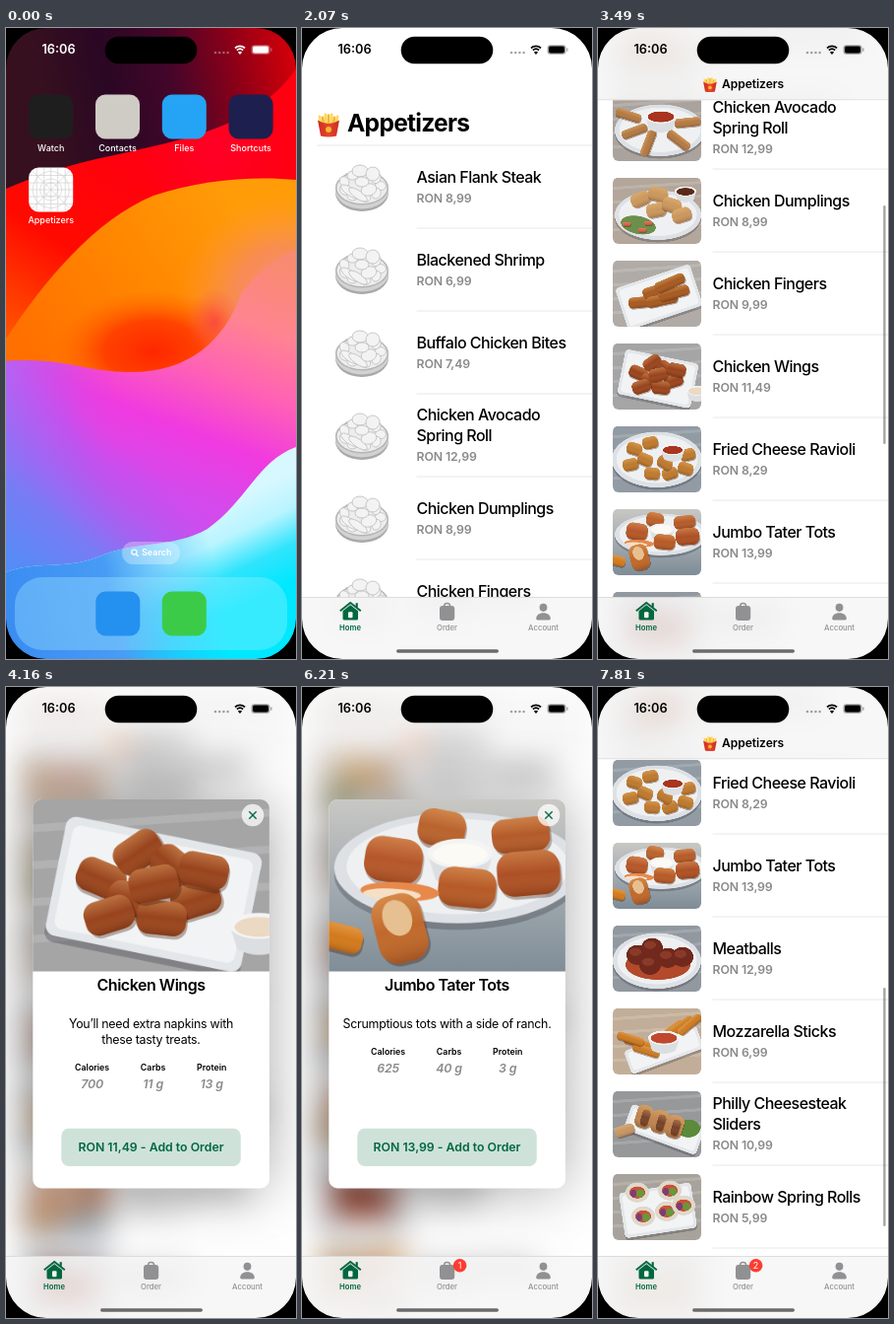
An HTML page with a canvas for the animation above (8000 ms loop, 295 by 640 pixels).

```html
<!DOCTYPE html>
<html lang="en">
<head>
<meta charset="utf-8">
<title>Appetizers</title>
<style>
html, body { margin: 0; width: 100%; height: 100%; overflow: hidden; background: #000; }
canvas { display: block; width: 295px; height: 640px; }
</style>
</head>
<body>
<canvas id="stage"></canvas>
<script>
const W = 295, H = 640, LOOP = 8000, TAU = Math.PI * 2;
const dpr = Math.max(1, window.devicePixelRatio || 1);
const GREEN = '#00683f', GRAY = '#8a8a8d';

function layer(w, h, scale, canvas = document.createElement('canvas')) {
  canvas.width = w * scale;
  canvas.height = h * scale;
  const g = canvas.getContext('2d');
  g.scale(scale, scale);
  return g;
}
const ctx = layer(W, H, dpr, document.getElementById('stage'));
const rows = layer(W, H, dpr), page = layer(W, H, dpr);

// ---------- helpers ----------
function text(g, str, x, y, size, weight, color, align = 'left', track = -0.01, style = '') {
  g.font = `${style} ${weight} ${size}px Inter, "Noto Sans", sans-serif`;
  g.letterSpacing = track * size + 'px';
  g.textAlign = align;
  g.textBaseline = 'middle';
  g.fillStyle = color;
  g.fillText(str, x, y);
}
function box(g, x, y, w, h, r, fill) {
  g.beginPath();
  g.roundRect(x, y, w, h, r);
  g.fillStyle = fill;
  g.fill();
}
function oval(g, x, y, rx, ry, fill, rot = 0) {
  g.beginPath();
  g.ellipse(x, y, rx, ry, rot, 0, TAU);
  g.fillStyle = fill;
  g.fill();
}
function line(g, pts, color, width) {
  g.beginPath();
  pts.forEach(([x, y], i) => i ? g.lineTo(x, y) : g.moveTo(x, y));
  g.strokeStyle = color;
  g.lineWidth = width;
  g.stroke();
}
function path(g, d, fill) {
  g.fillStyle = fill;
  g.fill(new Path2D(d));
}
function stops(grad, colors) {
  colors.forEach((c, i) => grad.addColorStop(i / (colors.length - 1), c));
  return grad;
}
const lin = (g, x0, y0, x1, y1, ...c) => stops(g.createLinearGradient(x0, y0, x1, y1), c);
const rad = (g, x, y, r, ...c) => stops(g.createRadialGradient(x, y, 0, x, y, r), c);
const at = (t, keys) => keys.reduce((v, k) => t >= k[0] ? k[1] : v, keys[0][1]);
const blit = (g, src) => g.drawImage(src.canvas, 0, 0, W, H);

// Soft stretched glow, kept inside an outline
function glow(g, d, x, y, rx, ry, ...colors) {
  g.save();
  g.clip(new Path2D(d));
  g.translate(x, y);
  g.scale(1, ry / rx);
  oval(g, 0, 0, rx, rx, rad(g, 0, 0, rx, ...colors));
  g.restore();
}

// ---------- food pictures, 90 x 67 each ----------
function bit(g, x, y, w, h, c, rot = 0) {
  g.save();
  g.translate(x, y);
  g.rotate(rot);
  const r = Math.min(w, h) * 0.38;
  box(g, -w / 2 + 0.6, -h / 2 + 1.2, w, h, r, 'rgba(60,25,10,.35)');
  box(g, -w / 2, -h / 2, w, h, r, c);
  box(g, -w / 2, -h / 2, w, h, r, lin(g, 0, -h / 2, 0, h / 2, 'rgba(255,200,130,.35)', 'rgba(255,200,130,0)', 'rgba(70,20,0,.25)'));
  g.restore();
}
const bits = (g, list, w, h, c) => list.forEach(([x, y, rot = 0]) => bit(g, x, y, w, h, c, rot));
function plate(g, x, y, rx, ry, rot = 0) {
  oval(g, x, y + 2.5, rx, ry, 'rgba(50,50,60,.3)', rot);
  oval(g, x, y, rx, ry, '#dde1e5', rot);
  oval(g, x, y - 0.5, rx * 0.9, ry * 0.86, '#eff0f1', rot);
}
function tray(g, x, y, w, h, rot) {
  g.save();
  g.translate(x, y);
  g.rotate(rot);
  box(g, -w / 2, -h / 2 + 2.5, w, h, 4, 'rgba(50,50,60,.3)');
  box(g, -w / 2, -h / 2, w, h, 4, '#e4e7ea');
  box(g, -w / 2 + 3, -h / 2 + 3, w - 6, h - 6, 3, '#f2f3f4');
  g.restore();
}
function cup(g, x, y, r, sauce) {
  path(g, `M${x - r} ${y}L${x - r * 0.75} ${y + r * 0.8}Q${x} ${y + r * 1.2} ${x + r * 0.75} ${y + r * 0.8}L${x + r} ${y}Z`, '#dcdfe2');
  oval(g, x, y, r, r * 0.45, '#f4f4f4');
  oval(g, x, y + 0.4, r * 0.84, r * 0.34, sauce);
}
function ring(n, x, y, rx, ry, from = 0, span = TAU) {
  return Array.from({ length: n }, (_, i) => {
    const a = from + span * i / n;
    return [x + Math.cos(a) * rx, y + Math.sin(a) * ry, a];
  });
}
const RED = '#a93420';
const dishes = [
  ['#a9a39d', g => { plate(g, 46, 36, 42, 26); bits(g, [[28, 32, -.4], [40, 34, -.4], [52, 36, -.4], [64, 38, -.4]], 9, 26, '#8a4429'); }],
  ['#b5b1aa', g => { plate(g, 45, 36, 41, 27); bits(g, ring(7, 45, 36, 25, 14), 15, 9, '#b9552b'); cup(g, 45, 33, 9, '#ead9a8'); }],
  ['#aeb0b2', g => { plate(g, 46, 36, 42, 26); bits(g, ring(8, 44, 37, 22, 12), 15, 12, '#c2561f'); cup(g, 64, 20, 10, '#f5f1e4'); }],
  ['#aaa39d', g => { plate(g, 48, 36, 46, 26); bits(g, [[16, 21, .3], [22, 37, -.35], [36, 49, -1.2], [67, 46, .65], [76, 28, -.1]], 27, 9, '#b27a45'); cup(g, 49, 22, 16, RED); }],
  ['#b3a69b', g => { plate(g, 46, 38, 44, 25); cup(g, 74, 14, 11, '#5a2a18'); oval(g, 26, 48, 18, 9, '#6d8f4d', .2); bits(g, [[14, 47], [30, 53], [36, 46]], 8, 4, '#d8604a'); bits(g, [[28, 22, -.4], [46, 17, .2], [44, 33, -.2], [60, 28, .3], [70, 38, -.3]], 20, 14, '#c9985f'); }],
  ['#b0aba6', g => { tray(g, 47, 37, 80, 44, -.32); bits(g, [[32, 42, -.1], [46, 30, -.3], [50, 40, -.2], [62, 33, -.25], [58, 23, -.4]], 32, 11, '#a55a22'); }],
  ['#a5a5a6', g => { tray(g, 46, 36, 76, 46, .2); cup(g, 86, 48, 11, '#ecd9c4'); bits(g, [[26, 30, .4], [40, 20, -.6], [38, 38, .2], [54, 26, .7], [62, 38, -.3], [49, 45, .1], [29, 44, -.3], [65, 27, .2], [46, 32, -.2]], 19, 13, '#98441e'); }],
  ['#929ba3', g => { plate(g, 45, 34, 46, 28); bits(g, [[22, 23, .3], [38, 17, -.2], [18, 39, -.2], [33, 34, .4], [40, 48, .1], [58, 48, -.3], [74, 43, .3], [53, 37, .5], [76, 29, -.2]], 16, 12, '#bd7a30'); cup(g, 61, 24, 12, RED); }],
  ['#9aa4ab', g => {
    g.fillStyle = lin(g, 0, 0, 0, 67, '#c9c8c4', '#a3abb1', '#7f8c96');
    g.fillRect(0, 0, 90, 67);
    plate(g, 49, 26, 47, 21);
    bit(g, 43, 11, 18, 14, '#b9632f', .2);
    bit(g, 73, 13.5, 22, 13, '#b45b2b', -.1);
    bit(g, 24.6, 23, 22, 17, '#b5572b', .15);
    bit(g, 76, 28, 24, 17, '#ad5026', -.08);
    cup(g, 50, 20.5, 12.5, '#fbfaf4');
    bit(g, 52.6, 33.5, 22, 15, '#b65a28', .1);
    oval(g, 27, 35, 15, 3.6, '#e8894c', .05);
    oval(g, 24, 36, 11, 2.2, '#f6dfc4', .05);
    bit(g, 3, 52, 20, 10, '#d27a1d', .25);
    bit(g, 27, 49, 19, 26, '#c0692c', -.25);
    oval(g, 26, 45, 5.5, 7, '#e6c090', -.4);
  }],
  ['#92989f', g => { plate(g, 45, 36, 45, 28); oval(g, 46, 40, 33, 15, '#b34a2b'); for (const [x, y] of [[25, 30], [40, 23], [56, 33], [71, 32], [38, 40]]) { oval(g, x, y, 11, 10, '#70291c'); oval(g, x - 2, y - 3, 6, 4, '#8a3a29'); } }],
  ['#c2ae98', g => { tray(g, 52, 42, 78, 25, -.35); bits(g, [[25, 35, .3], [34, 43, .3], [60, 22, -.6], [69, 18, -.6], [78, 17, -.7], [18, 31, .3]], 28, 8, '#cc7c24'); cup(g, 52, 30, 16, '#c0492d'); }],
  ['#96989a', g => { tray(g, 52, 39, 78, 27, .35); oval(g, 77, 38, 12, 9, '#5a8a3a'); bits(g, [[32, 26, .3], [48, 31, .3], [63, 36, .3]], 17, 23, '#bd8551'); bits(g, [[33, 27, .3], [49, 32, .3], [64, 37, .3]], 8, 16, '#75422b'); bit(g, 12, 40, 20, 11, '#c49867', -.3); }],
  ['#a7a39c', g => { tray(g, 46, 37, 74, 46, -.15); for (const [x, y] of [[25, 19], [58, 17], [31, 43], [55, 38], [72, 32]]) { oval(g, x, y, 12, 10, '#e0d8cb'); oval(g, x, y, 8, 6, '#c95238'); oval(g, x + 3, y + 1, 4, 4, '#6b963a'); oval(g, x - 4, y + 1, 3, 4, '#7e3d73'); } }],
  ['#b0a59d', g => { plate(g, 45, 36, 42, 27); bits(g, ring(6, 45, 36, 23, 12), 22, 11, '#b88447'); }]
].map(([bg, draw]) => {
  const g = layer(90, 67, 3);
  g.fillStyle = bg;
  g.fillRect(0, 0, 90, 67);
  for (let y = 11; y < 67; y += 14) line(g, [[0, y], [90, y - 6]], 'rgba(255,255,255,.14)', 3);
  draw(g);
  return g.canvas;
});

const menu = [
  ['Asian Flank Steak', '8,99'], ['Blackened Shrimp', '6,99'], ['Buffalo Chicken Bites', '7,49'],
  ['Chicken Avocado\nSpring Roll', '12,99'], ['Chicken Dumplings', '8,99'], ['Chicken Fingers', '9,99'],
  ['Chicken Wings', '11,49'], ['Fried Cheese Ravioli', '8,29'], ['Jumbo Tater Tots', '13,99'],
  ['Meatballs', '12,99'], ['Mozzarella Sticks', '6,99'], ['Philly Cheesesteak\nSliders', '10,99'],
  ['Rainbow Spring Rolls', '5,99'], ['', '']
];
const orders = [
  { from: 3900, to: 4680, item: 6, about: ['You’ll need extra napkins with', 'these tasty treats.'], facts: ['700', '11 g', '13 g'] },
  { from: 5950, to: 6590, item: 8, about: ['Scrumptious tots with a side of ranch.'], facts: ['625', '40 g', '3 g'] }
];
const scrollKeys = [
  [0, 0], [2940, 45], [3060, 190], [3170, 285], [3490, 312],
  [5110, 329], [5230, 362], [5350, 384], [5470, 396], [5590, 402],
  [7310, 450], [7430, 570], [7550, 628], [7810, 642]
];

// Grey bowl shown until a picture has loaded
function emptyDish(g, cx, cy) {
  oval(g, cx, cy + 5, 27, 19, '#a9a9a9');
  oval(g, cx, cy + 3, 27, 18.5, '#d2d2d2');
  oval(g, cx, cy, 27, 17.5, '#b5b5b5');
  oval(g, cx, cy, 25.5, 16, '#ededed');
  const blob = (x, y, rx, ry, rot) => {
    oval(g, cx + x, cy + y, rx, ry, '#f3f3f3', rot);
    g.strokeStyle = '#bcbcbc';
    g.lineWidth = 0.8;
    g.stroke();
  };
  for (const [x, y] of ring(9, 0, -2, 19, 12)) blob(x, y, 5.5, 4.5, x);
  blob(-2, -17, 8, 6, 0);
  blob(11, -14, 7, 7, 0);
  blob(-12, 4, 11, 4, 0.6);
  blob(-4, 7, 11, 4, 0.6);
  blob(7, 2, 8, 6, -0.3);
  blob(0, -6, 7, 5, 0);
}

function fries(g, x, y, s) {
  g.save();
  g.translate(x, y);
  g.scale(s, s);
  for (let i = 0; i < 7; i++) {
    g.save();
    g.translate(4.5 + i * 2.5, 13);
    g.rotate((i - 3) * 0.07);
    box(g, -1.3, -12 + Math.abs(i - 3) + (i % 2) * 2, 2.6, 14, 0.6, i % 2 ? '#f3b62f' : '#ffd75a');
    g.restore();
  }
  path(g, 'M1 9Q12 16 23 9L20 25Q12 27 4 25Z', lin(g, 0, 0, 24, 0, '#c9291f', '#e8452f', '#c9291f'));
  oval(g, 12, 18.5, 3, 3, '#f5b62d');
  g.restore();
}

// ---------- home screen ----------
function wallpaper(g) {
  g.fillStyle = lin(g, 120, 120, 0, 320, '#ff0010', '#ff0a00', '#ff5a00');
  g.fillRect(0, 0, W, H);
  g.fillStyle = rad(g, 215, 125, 80, 'rgba(255,0,48,.7)', 'rgba(255,0,48,0)');
  g.fillRect(0, 0, W, 260);

  path(g, 'M0 0H295V42C280 62 262 78 235 92C205 108 160 118 110 129C65 138 30 150 0 163Z',
    lin(g, 40, 70, 295, 20, '#36101f', '#2a0724', '#45062a', '#8c0018', '#d80008'));

  const petal = 'M0 315C40 255 90 195 150 170C200 153 255 150 295 154V420H0Z';
  path(g, petal, lin(g, 20, 320, 230, 170, '#ff7000', '#ff8600', '#ff9c08'));
  glow(g, petal, 285, 275, 110, 105, '#ff8a84', 'rgba(245,138,100,.8)', 'rgba(255,150,60,0)');
  glow(g, petal, 150, 328, 100, 62, '#ff2600', 'rgba(255,50,0,.8)', 'rgba(255,100,0,0)');
  glow(g, petal, 212, 298, 28, 34, 'rgba(250,60,70,.75)', 'rgba(250,90,80,0)');

  const pink = 'M0 338C60 334 80 349 125 349C185 350 222 318 240 268C262 240 280 230 295 225V640H0Z';
  path(g, pink, lin(g, 260, 235, 170, 470, '#f98a72', '#ff8490', '#ff62b4', '#f03ae0', '#d44aec'));
  path(g, pink, lin(g, 0, 400, 120, 380, '#b268f4', 'rgba(200,80,235,.7)', 'rgba(235,60,220,0)'));
  path(g, pink, lin(g, 0, 590, 130, 430, '#3f96f5', '#787cf5', 'rgba(170,90,245,0)'));

  const wave = 'M295 425C255 440 245 480 205 508C170 528 130 520 95 536C60 550 30 540 0 552V640H295Z';
  path(g, wave, lin(g, 225, 480, 268, 572, '#d8f8ff', '#b8f4ff', '#30e4fc', '#00e8ff'));
  path(g, wave, lin(g, 0, 600, 215, 560, '#3a8cf2', '#489cf5', 'rgba(40,190,250,0)'));
}

function gridIcon(g, x, y) {
  g.save();
  g.beginPath();
  g.roundRect(x, y, 45, 45, 10);
  g.fillStyle = '#fff';
  g.fill();
  g.clip();
  g.translate(x, y);
  for (const p of [8, 15.5, 22.5, 29.5, 37]) {
    line(g, [[p, 0], [p, 45]], '#c9c9c9', 0.6);
    line(g, [[0, p], [45, p]], '#c9c9c9', 0.6);
  }
  line(g, [[0, 0], [45, 45]], '#c9c9c9', 0.6);
  line(g, [[45, 0], [0, 45]], '#c9c9c9', 0.6);
  for (const r of [7, 11, 18.5]) {
    g.beginPath();
    g.arc(22.5, 22.5, r, 0, TAU);
    g.stroke();
  }
  g.restore();
}

function home(g, t) {
  wallpaper(g);
  status(g, '#fff');
  const apps = [['Watch', '#1e1e1f'], ['Contacts', '#cfcbc5'], ['Files', '#25a4f5'], ['Shortcuts', '#1d1f4e']];
  if (t < 870) {
    apps.forEach(([name, color], i) => {
      box(g, 23.2 + i * 67.8, 67.5, 45, 45, 10, color);
      text(g, name, 45.7 + i * 67.8, 122, 9, 500, '#fff', 'center', 0);
    });
    gridIcon(g, 23.2, 141.5);
    text(g, 'Appetizers', 45.7, 195.5, 9, 500, '#fff', 'center', 0);
    if (t >= 760) box(g, 23.2, 141.5, 45, 45, 10, 'rgba(0,0,0,.35)');
  }
  box(g, 118, 521, 59, 23, 11.5, 'rgba(255,255,255,.3)');
  g.beginPath();
  g.arc(130.4, 531.6, 2.6, 0, TAU);
  g.strokeStyle = '#fff';
  g.lineWidth = 1.2;
  g.stroke();
  line(g, [[132.3, 533.5], [134.6, 535.8]], '#fff', 1.4);
  text(g, 'Search', 138, 532.7, 9, 600, '#fff', 'left', 0);
  box(g, 9, 557, 277, 74, 28, 'rgba(170,240,255,.32)');
  box(g, 91.3, 571.5, 45, 45, 10, '#2490f0');
  box(g, 158.8, 571.5, 45, 45, 10, '#3ccb48');
}

// ---------- shared chrome ----------
function status(g, color) {
  text(g, '16:06', 53.5, 22, 12.75, 600, color, 'center', 0);
  g.save();
  g.globalAlpha = 0.35;
  for (let i = 0; i < 4; i++) oval(g, 213 + i * 4.2, 25, 1.3, 1.3, color);
  box(g, 249.5, 17.2, 19, 9.6, 3, color);
  box(g, 269.2, 20.2, 1.3, 3.6, 1, color);
  g.restore();
  box(g, 251, 18.6, 16, 6.8, 1.8, color);
  g.strokeStyle = color;
  g.lineWidth = 1.7;
  for (const r of [4.7, 7.6]) {
    g.beginPath();
    g.arc(238, 26, r, -2.3, -0.84);
    g.stroke();
  }
  path(g, 'M238 27L235.9 24.5Q238 22.8 240.1 24.5Z', color);
}

function tabs(g, count) {
  line(g, [[38.8, 591.2], [49.2, 583], [59.8, 591.2]], GREEN, 1.9);
  box(g, 54.6, 583.2, 2.2, 4.5, 0, GREEN);
  path(g, 'M41.5 591.2L49.2 585.2L57 591.2V599Q57 600.6 55.4 600.6H43Q41.5 600.6 41.5 599Z', GREEN);
  box(g, 47, 592.3, 4.5, 6, 1, '#f3f5f4');
  const icon = '#919193';
  box(g, 140, 586, 15.2, 15, 3, icon);
  g.beginPath();
  g.arc(147.6, 586.5, 3.1, Math.PI, 0);
  g.strokeStyle = icon;
  g.lineWidth = 1.5;
  g.stroke();
  oval(g, 245.5, 587.8, 3.9, 4.1, icon);
  path(g, 'M238.2 599.6C238 595.5 241.5 593.3 245.5 593.3S253 595.5 252.8 599.6Q252.6 600.4 251.5 600.4H239.5Q238.4 600.4 238.2 599.6Z', icon);
  text(g, 'Home', 49, 608.8, 7.7, 600, GREEN, 'center', 0);
  text(g, 'Order', 147.5, 608.8, 7.7, 500, icon, 'center', 0);
  text(g, 'Account', 245.5, 608.8, 7.7, 500, icon, 'center', 0);
  if (count) {
    oval(g, 160.6, 586.8, 6.8, 6.8, '#ff3b30');
    text(g, count, 160.6, 587, 9, 400, '#fff', 'center', 0);
  }
}

function spinner(g, t) {
  const head = 4 + Math.floor((t - 980) / 125) + 80;
  for (let i = 0; i < 8; i++) {
    const age = (head - i) % 8;
    g.save();
    g.translate(147.5, 312.3);
    g.rotate(i * TAU / 8);
    box(g, 4.6, -1.3, 6.6, 2.6, 1.3, `rgba(30,75,70,${Math.max(0.1, 0.42 - age * 0.07)})`);
    g.restore();
  }
}

// ---------- app ----------
function drawRows(g, scroll, loaded) {
  g.fillStyle = '#fff';
  g.fillRect(0, 0, W, H);
  fries(g, 15, 84.5 - scroll, 1);
  text(g, 'Appetizers', 46, 98 - scroll, 24.6, 700, '#000', 'left', -0.03);
  line(g, [[15, 119 - scroll], [W, 119 - scroll]], '#e2e2e4', 0.8);
  menu.forEach(([name, price], i) => {
    const cy = 161 + i * 84 - scroll;
    if (cy < -50 || cy > H + 50) return;
    if (loaded) {
      g.save();
      g.beginPath();
      g.roundRect(15, cy - 33.5, 90, 67.5, 6);
      g.clip();
      g.drawImage(dishes[i], 15, cy - 33.5, 90, 67.5);
      g.restore();
    } else emptyDish(g, 61, cy + 1);
    const lines = name.split('\n'), two = lines.length > 1;
    lines.forEach((s, k) => text(g, s, 116.5, cy + (two ? -19.8 : -9) + k * 20.7, 16, 500, '#000', 'left', -0.032));
    if (price) text(g, 'RON ' + price, 116.5, cy + (two ? 22.5 : 12), 12.3, 600, GRAY);
    line(g, [[116.5, cy + 42], [W, cy + 42]], '#e2e2e4', 0.8);
  });
}

function frost(g, y, h, lineY) {
  g.save();
  g.beginPath();
  g.rect(0, y, W, h);
  g.clip();
  g.fillStyle = '#fff';
  g.fillRect(0, y, W, h);
  g.filter = `blur(${14 * dpr}px)`;
  blit(g, rows);
  g.filter = 'none';
  g.fillStyle = 'rgba(246,246,246,.84)';
  g.fillRect(0, y, W, h);
  line(g, [[0, lineY], [W, lineY]], '#c9c9cb', 0.7);
  g.restore();
}

function card(g, order, ready) {
  const [name, price] = menu[order.item];
  g.save();
  g.shadowColor = 'rgba(0,0,0,.33)';
  g.shadowBlur = 60 * dpr;
  box(g, 27.3, 114, 240.6, 394.5, 9, '#fff');
  g.restore();
  g.save();
  g.beginPath();
  g.roundRect(27.3, 114, 240.6, 174.5, [9, 9, 0, 0]);
  g.clip();
  if (ready) g.drawImage(dishes[order.item], 27.3, 114, 240.6, 179);
  else {
    g.translate(147.5, 200);
    g.scale(2.6, 2.6);
    emptyDish(g, 0, 0);
  }
  g.restore();
  oval(g, 251, 130, 11.3, 11.3, 'rgba(255,255,255,.75)');
  line(g, [[247.3, 126.3], [254.7, 133.7]], GREEN, 1.3);
  line(g, [[254.7, 126.3], [247.3, 133.7]], GREEN, 1.3);
  text(g, name, 147.5, 303, 16, 600, '#000', 'center', -0.03);
  order.about.forEach((s, i) => text(g, s, 147.5, 342.3 + i * 15.5, 12.4, 400, '#000', 'center', -0.02));
  const factsY = 370.5 + (order.about.length - 1) * 15.5;
  ['Calories', 'Carbs', 'Protein'].forEach((s, i) => {
    const x = [87.6, 149.6, 209.2][i];
    text(g, s, x, factsY, 8.8, 600, '#000', 'center', 0);
    text(g, order.facts[i], x, factsY + 16.8, 12.4, 600, GRAY, 'center', -0.01, 'italic');
  });
  box(g, 56.3, 447.7, 182.5, 38.3, 7.5, '#cfe2da');
  text(g, `RON ${price} - Add to Order`, 147.5, 467, 12.3, 600, GREEN, 'center', 0);
}

function loading(g, t, fade) {
  g.fillStyle = '#fff';
  g.fillRect(0, 0, W, H);
  status(g, '#000');
  g.save();
  g.globalAlpha = fade;
  tabs(g, 0);
  g.restore();
  spinner(g, t);
}

function list(g, t) {
  const scroll = at(t, scrollKeys);
  const open = orders.find(o => t >= o.from && t < o.to);
  drawRows(rows, scroll, t >= 2470);
  blit(page, rows);
  if (scroll > 20) {
    frost(page, 0, 73.3, 73);
    page.save();
    page.globalAlpha = Math.min(1, (scroll - 20) / 26);
    fries(page, 106.5, 49, 0.62);
    text(page, 'Appetizers', 126, 57, 12.1, 600, '#000', 'left', -0.005);
    page.restore();
  }
  const moving = (t >= 2940 && t < 3900) || (t >= 5110 && t < 5950) || t >= 7310;
  if (moving) box(page, 290.2, 180 + (scroll - 312) * 0.379, 2.4, 242, 1.2, 'rgba(0,0,0,.36)');
  g.fillStyle = '#fff';
  g.fillRect(0, 0, W, H);
  if (open) {
    g.filter = `blur(${15 * dpr}px)`;
    blit(g, page);
    g.filter = 'none';
    card(g, open, t >= open.from + 130);
  } else blit(g, page);
  status(g, '#000');
  frost(g, 577, 63, 577.3);
  tabs(g, orders.filter(o => t >= o.to).length);
}

function launch(g, t) {
  home(g, t);
  if (t < 870) return;
  const [x, y, w, h] = at(t, [[870, [15, 92, 160, 285]], [980, [2.6, 25, 271.5, 562]], [1080, [0.5, 5, 290, 627]]]);
  g.fillStyle = `rgba(0,0,0,${t < 980 ? 0.25 : 0.42})`;
  g.fillRect(0, 0, W, H);
  g.save();
  g.beginPath();
  g.roundRect(x, y, w, h, 41 * w / W);
  g.clip();
  g.translate(x, y);
  g.scale(w / W, w / W);
  loading(g, t, at(t, [[870, 0.1], [980, 0.38], [1080, 0.75]]));
  g.restore();
  bar(g, x + w / 2, y + h - 8, w / W);
}

const bar = (g, x, y, s) => box(g, x - 52 * s, y - 1.8, 104 * s, 3.6, 1.8, '#6b6b6d');

function draw(t) {
  ctx.clearRect(0, 0, W, H);
  if (t < 1190) launch(ctx, t);
  else {
    if (t < 2070) loading(ctx, t, 1);
    else list(ctx, t);
    bar(ctx, 148, 632, 1);
  }
  box(ctx, 100.7, 8.7, 93.6, 27.6, 13.8, '#000');
  ctx.beginPath();
  ctx.rect(0, 0, W, H);
  ctx.roundRect(0, 0, W, H, 41);
  ctx.fillStyle = '#000';
  ctx.fill('evenodd');
}

const start = performance.now();
function tick() {
  draw((performance.now() - start) % LOOP);
  requestAnimationFrame(tick);
}
tick();
</script>
</body>
</html>
```
